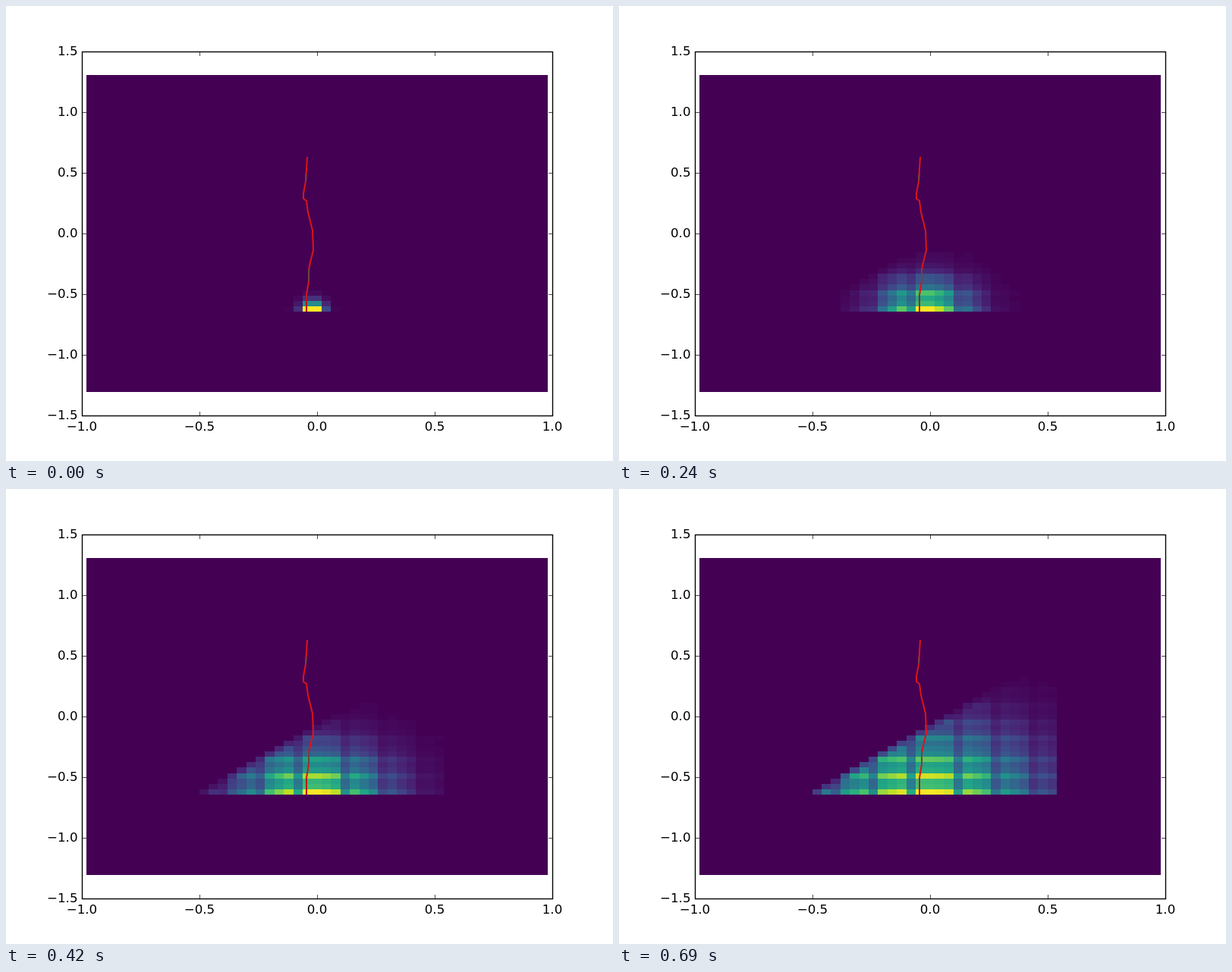
An HTML page with a canvas for the animation above (0.72 s loop, 800 px wide and 600 px high).

```html
<!DOCTYPE html>
<html lang="en">
<head>
<meta charset="utf-8">
<title>Spreading density</title>
<style>
  html, body { margin: 0; width: 100%; height: 100%; overflow: hidden; background: #fff; }
  canvas, svg { position: absolute; left: 0; top: 0; display: block; }
  text { font: 16.67px "DejaVu Sans", sans-serif; fill: #000; }
</style>
</head>
<body>
<canvas id="field" width="800" height="600"></canvas>
<svg id="plot" width="800" height="600" viewBox="0 0 800 600"></svg>
<script>
const STEP = 30, STEPS = 24;
const LEFT = 106, TOP = 91, WIDTH = 608, HEIGHT = 418;
const CELL_W = WIDTH / 49, CELL_H = HEIGHT / 59;
const GRID_X = LEFT - .3, BASE = TOP + .15 + CELL_H * 44;
const FIRST_COL = 12, LAST_COL = 37, CENTRE = 23.5;

const VIRIDIS = ["440154", "482475", "414487", "355f8d", "2a788e", "21918c",
  "22a884", "44bf70", "7ad151", "bddf26", "fde725"]
  .map(h => [0, 2, 4].map(i => parseInt(h.slice(i, i + 2), 16)));

function colour(v) {
  const p = Math.min(1, Math.max(0, v)) * (VIRIDIS.length - 1);
  const i = Math.min(VIRIDIS.length - 2, Math.floor(p));
  const mix = VIRIDIS[i].map((a, k) => Math.round(a + (VIRIDIS[i + 1][k] - a) * (p - i)));
  return `rgb(${mix})`;
}

const bell = (d, width) => Math.exp(-d * d / (width * width));

// Every 4.2 columns one is dim; every 3.2 rows one is bright
const colWeight = c => bell(c - CENTRE, 14.5) * ((c - 9.25) % 4.2 < 1 ? .62 : 1);
const rowWeight = r => bell(r, 15) * ((r + .5) % 3.2 < 1 ? 1 : .7);

const ctx = document.getElementById("field").getContext("2d");

function drawField(n) {
  const spreadX = 1.15 + .33 * n + .015 * n * n;
  const spreadY = 1.6 + .38 * n + .013 * n * n;
  const peak = bell(.5, spreadX);
  ctx.fillStyle = colour(0);
  ctx.fillRect(LEFT, TOP, WIDTH, HEIGHT);
  for (let c = FIRST_COL; c <= LAST_COL; c++) {
    const x0 = Math.round(GRID_X + c * CELL_W), x1 = Math.round(GRID_X + (c + 1) * CELL_W);
    const across = colWeight(c) * bell(c - CENTRE, spreadX) / peak;
    const rim = c - FIRST_COL;
    for (let r = 0; r <= rim; r++) {
      const v = across * rowWeight(r) * bell(r, spreadY) * (r === rim ? .55 : 1);
      if (v < .008) continue;
      const y0 = Math.round(BASE - (r + 1) * CELL_H), y1 = Math.round(BASE - r * CELL_H);
      ctx.fillStyle = colour(v);
      ctx.fillRect(x0, y0, x1 - x0, y1 - y0);
    }
  }
}

const plot = document.getElementById("plot");

function add(tag, attrs, text) {
  const el = document.createElementNS("http://www.w3.org/2000/svg", tag);
  for (const k in attrs) el.setAttribute(k, attrs[k]);
  if (text) el.textContent = text;
  plot.appendChild(el);
}

function trail(points, stroke) {
  add("polyline", { points, stroke, fill: "none", "stroke-width": 2, "stroke-linejoin": "round" });
}

function label(v) {
  return v.toFixed(1).replace("-", "\u2212");
}

function drawAxes() {
  trail("397,199 395,231 392,247 392,254 396,257 398,272 404,296 405,322 401,338 399,348 399,363 396,381 396,403", "#dc1416");
  trail("395.6,222 395,231", "#70443f");
  trail("399,347 399,363", "#70443f");
  trail("396,381 396,403", "#b81518");

  let ticks = "";
  for (let i = 0; i < 5; i++) {
    const x = 100 + 155 * i;
    ticks += `M${x + .5} 540.5v-5.5M${x + .5} 60.5v5.5`;
    add("text", { x, y: 560, "text-anchor": "middle" }, label(-1 + i * .5));
  }
  for (let i = 0; i < 7; i++) {
    const y = 60 + 80 * i;
    ticks += `M100.5 ${y + .5}h5.5M720.5 ${y + .5}h-5.5`;
    add("text", { x: 94.5, y: y + 5, "text-anchor": "end" }, label(1.5 - i * .5));
  }
  add("path", { d: ticks, stroke: "#000", "stroke-width": .7 });
  add("rect", { x: 100.5, y: 60.5, width: 620, height: 480, fill: "none", stroke: "#000", "stroke-width": 1.39 });
}

const start = performance.now();
let shown = -1;

function tick() {
  const n = Math.floor((performance.now() - start) / STEP) % STEPS;
  if (n !== shown) drawField(shown = n);
  requestAnimationFrame(tick);
}

drawAxes();
tick();
</script>
</body>
</html>
```
